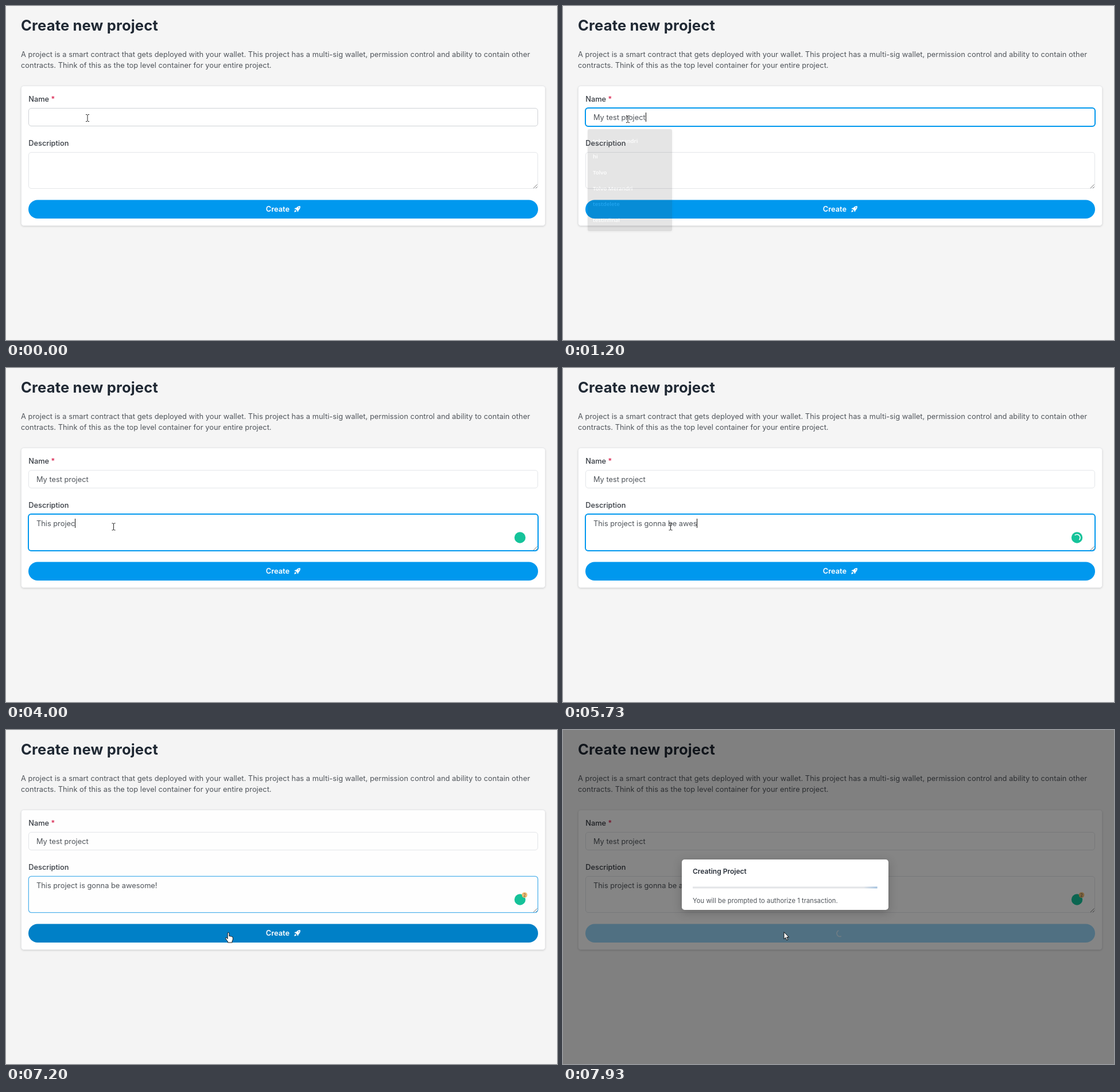
An HTML page for the animation above (8000 ms loop, 960x583 px).

```html
<!DOCTYPE html>
<html lang="en">
<head>
<meta charset="utf-8">
<title>Create new project</title>
<style>
html, body { margin: 0; width: 100%; height: 100%; overflow: hidden; background: #f5f5f5; }
svg { display: block; }
#stage { position: absolute; left: 0; top: 0; font: 12.8px Inter, sans-serif; font-optical-sizing: none; }
text { white-space: pre; fill: #50555b; }
.title { font-size: 25.6px; font-weight: 700; letter-spacing: .14px; fill: #202934; }
.intro { letter-spacing: .05px; }
.label { font-weight: 500; fill: #373c43; }
.bold { font-weight: 600; fill: #29303a; }
.card { fill: #fff; stroke: #e7e8ea; filter: drop-shadow(0 1px 1.5px rgba(0,0,0,.14)); }
.field { fill: #fff; stroke: #e4e6e9; }
.ring { fill: none; stroke: #0098ee; }
.arc { fill: none; stroke: #fff; stroke-width: 1.6; }
.pointer { fill: #fff; stroke: #000; stroke-width: .9; stroke-linejoin: round; }
#menu text { font: 600 9.6px "Open Sans", sans-serif; fill: #fff; }
</style>
</head>
<body>
<svg id="stage" width="960" height="583" viewBox="0 0 960 583">
  <defs>
    <linearGradient id="glow">
      <stop offset="0" stop-color="#3182ce" stop-opacity="0"/>
      <stop offset=".5" stop-color="#3182ce"/>
      <stop offset="1" stop-color="#3182ce" stop-opacity="0"/>
    </linearGradient>
  </defs>
  <rect width="960" height="583" fill="#f5f5f5"/>
  <text class="title" x="26" y="42.5">Create new project</text>
  <text class="intro" x="26" y="88.5">A project is a smart contract that gets deployed with your wallet. This project has a multi-sig wallet, permission control and ability to contain other</text>
  <text class="intro" x="26" y="107.7">contracts. Think of this as the top level container for your entire project.</text>

  <rect class="card" x="26.5" y="139.5" width="913" height="244" rx="4.5"/>
  <text class="label" x="39.3" y="166.5">Name <tspan fill="#d9234f">*</tspan></text>
  <rect id="nameBox" class="field" x="39.5" y="178.5" width="887" height="31" rx="4.5"/>
  <rect id="nameRing" class="ring" rx="4.8"/>
  <text id="nameText" x="53" y="198.7"></text>
  <text class="label" x="39.3" y="243.7">Description</text>
  <rect class="field" x="39.5" y="255.5" width="887" height="63" rx="4.5"/>
  <path d="M919 318L925.5 311.5M923 318L925.5 315.5" stroke="#777" fill="none"/>
  <rect id="descRing" class="ring" rx="4.8"/>
  <text id="descText" x="53" y="276"></text>
  <rect id="caret" width="1" height="16" fill="#111"/>

  <g id="badge">
    <circle cx="895.5" cy="296" r="9.7" fill="#15c39a"/>
    <path id="loader" class="arc" d="M0-5.5A5.5 5.5 0 0 1 0 5.5"/>
    <g id="count">
      <circle cx="903.5" cy="288" r="4.8" fill="#f6be70"/>
      <text x="903.5" y="290.7" font-size="7.5" text-anchor="middle">2</text>
    </g>
  </g>

  <rect id="button" x="39" y="338.5" width="888" height="32.4" rx="16.2"/>
  <g id="caption" fill="#fff">
    <text class="bold" x="452.8" y="359" style="fill:#fff">Create</text>
    <path fill-rule="evenodd" d="M512.8 349.4C509.4 349 507.2 350.2 505.8 352.4L504 352.6Q503.2 352.9 502.6 354.4L504.7 354.6L507.5 357.4L507.7 359.5Q509.2 358.9 509.5 358.1L509.7 356.4C511.8 355 513.1 352.8 512.8 349.4ZM511 352.1A.9.9 0 1 0 509.2 352.1A.9.9 0 1 0 511 352.1ZM504.2 356Q502.5 356.6 502.2 359.8Q505.5 359.5 506.1 357.9Z"/>
  </g>
  <path id="spinner" class="arc" stroke-opacity=".6" d="M0-5.5A5.5 5.5 0 0 1 0 5.5"/>

  <g id="menu">
    <rect x="43" y="215" width="147" height="178" rx="3" fill="#3b3b3b" style="filter:drop-shadow(0 1px 2px rgba(0,0,0,.4))"/>
  </g>

  <rect id="shade" width="960" height="583"/>
  <g id="dialog">
    <rect x="207" y="226" width="360" height="88" rx="4.8" fill="#fff" style="filter:drop-shadow(0 4px 8px rgba(0,0,0,.22))"/>
    <text class="bold" x="226" y="250.6" font-size="12">Creating Project</text>
    <svg x="226" y="273.2" width="321.6" height="3.4">
      <rect width="322" height="4" fill="#e3e5e8"/>
      <rect id="bar" width="128.6" height="4" fill="url(#glow)"/>
    </svg>
    <text class="intro" x="226" y="302.3" font-size="11.2">You will be prompted to authorize 1 transaction.</text>
  </g>

  <g id="mouse">
    <path id="beam" d="M-3-6H-1L0-5L1-6H3M0-5V5M-3 6H-1L0 5L1 6H3" fill="none" stroke="#222"/>
    <path id="arrow" class="pointer" d="M0 0V12.2L2.8 9.6L4.8 14.2L6.8 13.3L4.8 8.9H8.6Z"/>
    <path id="hand" class="pointer" d="M-1.4 1Q-1.4-.6 0-.6Q1.4-.6 1.4 1V6Q2.8 5 4 6.4Q5.4 5.6 6.2 7Q7.8 6.6 7.8 8.5V11Q7.8 13 6.6 14.5V17H-1V15.5Q-4 12-5 9.5Q-5 8-3.5 8.4L-1.4 10.5Z"/>
  </g>
</svg>
<script>
const LOOP = 8000, FOCUS = 670, PASTE = 1070, SWITCH = 2130, BLUR = 7130, OPEN = 7215;
const NAME = 'My test project', DESC = 'This project is gonna be awesome!';

// [time, value...] points, linear between them
const TYPING = [[2900, 0], [3470, 6], [3530, 7], [3670, 8], [3800, 10], [4000, 11], [4870, 20], [5730, 29], [6130, 33]];
const MOUSE = [[130, 142, 195.5], [470, 113, 197.5], [1330, 113, 197.5], [1870, 187.5, 277],
               [6620, 187.5, 277], [7080, 387.5, 354], [7210, 387.5, 354], [7270, 385, 352.7]];
const BUTTON = [[6980, 0, 152, 238], [7120, 0, 128, 200], [7210, 0, 128, 200], [7400, 153, 214, 248]];

const $ = id => document.getElementById(id);
const set = (id, attrs) => { for (const k in attrs) $(id).setAttribute(k, attrs[k]); };
const show = (id, on) => set(id, { visibility: on ? 'visible' : 'hidden' });
const ramp = (t, a, b) => Math.min(1, Math.max(0, (t - a) / (b - a)));
const smooth = x => x * x * (3 - 2 * x);

function track(points, t, shape = x => x) {
  let i = points.findIndex(p => p[0] > t);
  if (i < 0) i = points.length;
  const a = points[Math.max(0, i - 1)], b = points[Math.min(i, points.length - 1)];
  const k = a === b ? 0 : shape(ramp(t, a[0], b[0]));
  return a.slice(1).map((v, n) => v + (b[n + 1] - v) * k);
}

// CSS "ease": cubic-bezier(.25, .1, .25, 1)
function ease(x) {
  let u = x;
  for (let i = 0; i < 8; i++) u -= (.75 * u - .75 * u * u + u ** 3 - x) / (.75 - 1.5 * u + 3 * u * u);
  return .3 * u * (1 - u) ** 2 + 3 * u * u * (1 - u) + u ** 3;
}

['tolvaro merandri', 'hi', 'Tolvo', 'Tolvo Merandri', 'testdelete', 'testinfinal'].forEach((word, i) => {
  const row = document.createElementNS('http://www.w3.org/2000/svg', 'text');
  row.setAttribute('x', 52);
  row.setAttribute('y', 238.6 + 27.7 * i);
  row.textContent = word;
  $('menu').append(row);
});

// A 1px border whose outer glow spreads by up to 1px
function ring(id, y, height, k) {
  const spread = Math.max(0, 2 * k - 1);
  show(id, k > 0);
  set(id, {
    x: 39.5 - spread / 2, y: y - spread / 2, width: 887 + spread, height: height + spread,
    opacity: k, 'stroke-width': 1 + spread
  });
}

function spin(id, x, y, angle) {
  set(id, { transform: `translate(${x} ${y}) rotate(${angle})` });
}

function draw(t) {
  const [mx, my] = track(MOUSE, t, smooth);
  const moved = t < SWITCH ? 0 : t < 2330 ? .6 : 1;
  ring('nameRing', 178.5, 31, ramp(t, FOCUS - 66, 870) * (t >= FOCUS) * (1 - moved));
  ring('descRing', 255.5, 63, moved * (1 - ramp(t, BLUR, BLUR + 200)));
  set('nameBox', { style: `stroke:${my < 210 ? '#cfd2d6' : '#e4e6e9'}` });

  $('nameText').textContent = t < PASTE ? '' : NAME;
  $('descText').textContent = DESC.slice(0, Math.floor(track(TYPING, t)[0] + 1e-6));

  const inDesc = t >= SWITCH;
  const last = t > 6130 ? 6130 : t >= 2900 ? t : inDesc ? SWITCH : t >= PASTE ? PASTE : FOCUS;
  show('caret', t >= FOCUS && t < BLUR && (t - last) % 1060 < 530);
  set('caret', {
    x: Math.round(53 + $(inDesc ? 'descText' : 'nameText').getComputedTextLength()),
    y: inDesc ? 263 : 186
  });

  const menu = ramp(t, FOCUS, 870) * (1 - ramp(t, PASTE, PASTE + 150));
  set('menu', { opacity: menu });

  show('badge', t >= 2470);
  show('loader', t >= 2530 && t < 3480 || t > 4060 && t < 6465);
  show('count', t >= 6465);
  spin('loader', 895.5, 296, 100 + (t - 2670) / 850 * 360);

  const busy = t >= 7240;
  set('button', { fill: `rgb(${track(BUTTON, t).map(Math.round)})` });
  show('caption', !busy);
  show('spinner', busy);
  spin('spinner', 482.5, 355, 155 + (t - 7930) / 450 * 360);

  set('shade', { opacity: .48 * ramp(t, 7200, 7400) });
  const k = 1 - (1 - ramp(t, OPEN, 7400)) ** 2, size = .95 + .05 * k;
  set('dialog', { opacity: k, transform: `translate(387 270) scale(${size}) translate(-387 -270)` });
  const phase = ease(Math.max(0, t - OPEN) % 1000 / 1000);
  set('bar', { x: 321.6 * (1.4 * phase - .4) });

  const shape = busy ? 'arrow' : my < 320 ? 'beam' : my < 338 ? 'arrow' : 'hand';
  for (const id of ['beam', 'arrow', 'hand']) show(id, id === shape);
  set('mouse', { transform: `translate(${mx} ${my})` });
}

function tick() {
  draw(performance.now() % LOOP);
  requestAnimationFrame(tick);
}
tick();
</script>
</body>
</html>
```
